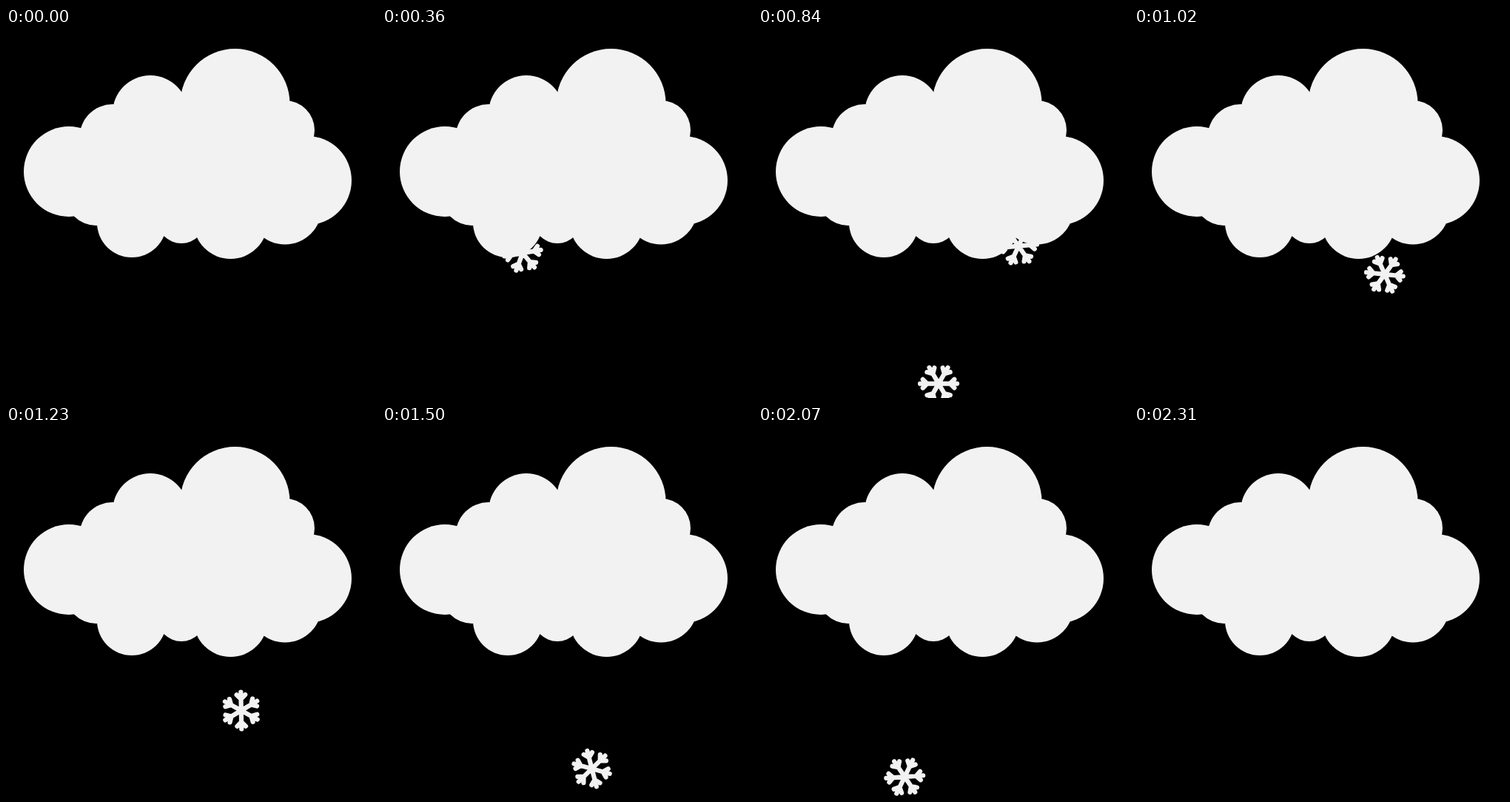
An HTML page with a canvas that plays this animation: 500x500 px, repeating every 2370 ms.

```html
<!DOCTYPE html>
<html lang="en">
<head>
<meta charset="utf-8">
<title>Snow cloud</title>
<style>
  html, body { margin: 0; width: 100%; height: 100%; overflow: hidden; background: #000; }
  canvas { display: block; }
</style>
</head>
<body>
<canvas id="stage" width="500" height="500"></canvas>
<script>
const ctx = document.getElementById('stage').getContext('2d');
const LOOP = 2370, STEP = 30;                   // ms
const FIRST = 5, SPACING = 620, FALL = 1064;    // ms
const SPIN = 0.395;                             // degrees per ms

// Cloud puffs in outline order: x, y, radius
const puffs = [
  [85, 194, 61], [144, 147.5, 44.5], [195, 115, 51], [309.5, 102, 74],
  [377, 138, 40], [407, 206, 60], [377, 243, 49.5], [303.5, 262, 50],
  [237, 258, 33], [170, 263, 47], [122, 225, 42]
];

// One Bézier path per flake: start, two handles, end
const paths = [
  [[198, 258], [172, 222], [197, 491], [300, 535]],
  [[361, 256], [353, 314], [310, 400], [256, 527]],
  [[200, 256], [114, 230], [171, 490], [243, 527]]
];

function bezier([a, b, c, d], p) {
  const q = 1 - p;
  return [0, 1].map(k =>
    q ** 3 * a[k] + 3 * q * q * p * b[k] + 3 * q * p * p * c[k] + p ** 3 * d[k]);
}

function drawFlake([x, y], degrees) {
  ctx.save();
  ctx.translate(x, y);
  ctx.rotate(degrees * Math.PI / 180);
  ctx.beginPath();
  for (let arm = 0; arm < 6; arm++) {
    ctx.moveTo(0, 0);
    ctx.lineTo(0, -25);
    ctx.moveTo(-5.8, -21.3);
    ctx.lineTo(0, -15.5);
    ctx.lineTo(5.8, -21.3);
    ctx.rotate(Math.PI / 3);
  }
  ctx.stroke();
  ctx.restore();
}

function drawCloud() {
  ctx.beginPath();
  for (const [x, y] of puffs) ctx.lineTo(x, y);
  ctx.fill();
  for (const [x, y, r] of puffs) {
    ctx.beginPath();
    ctx.arc(x, y, r, 0, 2 * Math.PI);
    ctx.fill();
  }
}

function draw(now) {
  const time = Math.floor(now % LOOP / STEP) * STEP;
  ctx.fillStyle = '#000';
  ctx.fillRect(0, 0, 500, 500);
  ctx.fillStyle = ctx.strokeStyle = '#f2f2f2';
  ctx.lineWidth = 6.2;
  ctx.lineCap = ctx.lineJoin = 'round';
  paths.forEach((path, i) => {
    const age = time - FIRST - i * SPACING;
    if (age >= 0 && age < FALL) drawFlake(bezier(path, age / FALL), age * SPIN);
  });
  drawCloud();
}

const begin = performance.now();
function tick() {
  draw(performance.now() - begin);
  requestAnimationFrame(tick);
}
tick();
</script>
</body>
</html>
```
